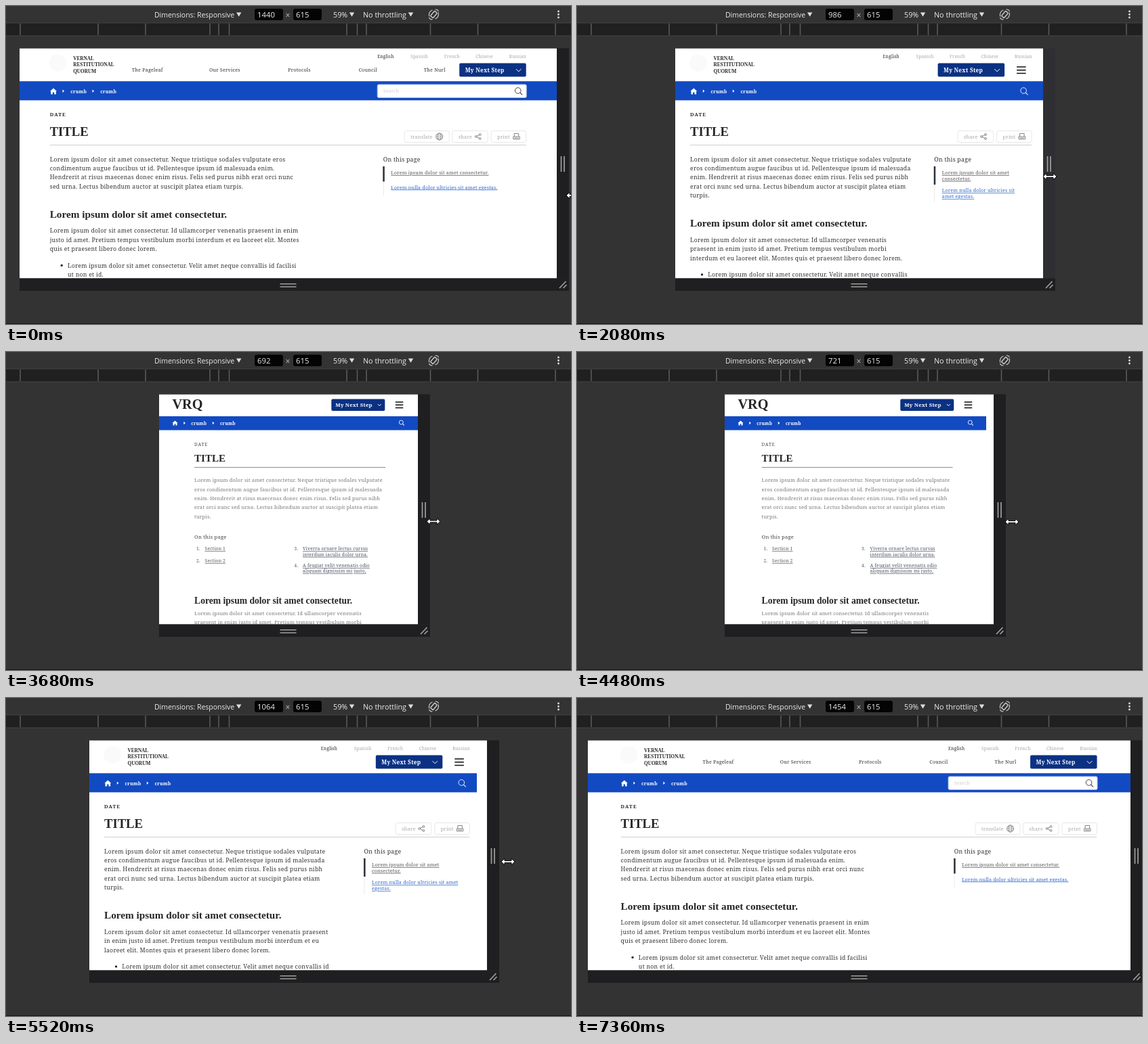
Recreate the animation shown at these times as an HTML page. Size 834 px wide and 470 px high, loop 7.44 s.

```html
<!DOCTYPE html>
<html lang="en">
<head>
<meta charset="utf-8">
<title>Responsive resize</title>
<style>
  html, body { margin: 0; width: 100%; height: 100%; overflow: hidden; background: #333; }
  svg { display: block; }
  text { white-space: pre; }
  .ui { font-family: "Open Sans", "Noto Sans", sans-serif; fill: #ececec; }
  .body { font-family: "Noto Serif", serif; letter-spacing: .03em; }
  .head { font-family: "Liberation Serif", "Times New Roman", serif; font-weight: 700; }
  .link { text-decoration: underline; text-decoration-thickness: .6px; text-underline-offset: 1.6px; }
</style>
</head>
<body>
<svg id="stage" width="834" height="470" viewBox="0 0 834 470"></svg>
<script>
const LOOP = 7440, STEP = 80, SCALE = 0.5503, MID = 416.6;
const TOP = 62.5, BOTTOM = 402.5;
const BLUE = '#124ac2', NAVY = '#0b3183', INK = '#262626';

// [time, viewport width]
const WIDTHS = [[0, 1440], [160, 1454], [400, 1454], [800, 1404], [1040, 1277], [1120, 1277],
  [1600, 1114], [2000, 996], [2080, 986], [2400, 896], [2880, 752], [2960, 742], [3200, 721],
  [3600, 692], [4000, 692], [4320, 701], [4400, 701], [4480, 721], [4800, 801], [5360, 1039],
  [5440, 1060], [5520, 1064], [5600, 1096], [6400, 1314], [7120, 1454], [7440, 1454]];
const CURSOR_X = [[0, 837], [200, 848], [800, 821], [1120, 789], [1600, 744], [2080, 698],
  [2400, 674], [2960, 640.5], [3200, 631], [4000, 631], [4480, 642], [4800, 680],
  [5520, 741], [6400, 802], [7200, 850]];
const CURSOR_Y = [[0, 280], [1120, 264], [2080, 252], [2960, 250], [4480, 251], [5520, 242], [7200, 240]];

const INTRO = 'Lorem ipsum dolor sit amet consectetur. Neque tristique sodales vulputate eros condimentum augue faucibus ut id. Pellentesque ipsum id malesuada enim. Hendrerit at risus maecenas donec enim risus. Felis sed purus nibh erat orci nunc sed urna. Lectus bibendum auctor at suscipit platea etiam turpis.';
const DETAIL = 'Lorem ipsum dolor sit amet consectetur. Id ullamcorper venenatis praesent in enim justo id amet. Pretium tempus vestibulum morbi interdum et eu laoreet elit. Montes quis et praesent libero donec lorem.';
const ITEM = 'Lorem ipsum dolor sit amet consectetur. Velit amet neque convallis id facilisi ut non et id.';
const HEADING = 'Lorem ipsum dolor sit amet consectetur.';

// word counts after which each paragraph breaks
const BREAKS = {
  wide: { intro: [11, 21, 35], detail: [12, 25], item: [12] },
  mid: { intro: [10, 20, 32, 44], detail: [10, 22], item: [11] },
  narrow: { intro: [10, 20, 32, 44], detail: [9, 19], item: [10] }
};

function at(table, t) {
  if (t <= table[0][0]) return table[0][1];
  for (let i = 1; i < table.length; i++) {
    const [t0, a] = table[i - 1], [t1, b] = table[i];
    if (t <= t1) return a + (b - a) * (t - t0) / (t1 - t0);
  }
  return table[table.length - 1][1];
}

const widthAt = t => Math.round(at(WIDTHS, t));

function wrap(text, breaks) {
  const words = text.split(' '), cuts = [0, ...breaks, words.length];
  return cuts.slice(1).map((end, i) => words.slice(cuts[i], end).join(' '));
}

const rect = (x, y, w, h, fill, extra = '') =>
  `<rect x="${x}" y="${y}" width="${w}" height="${h}" fill="${fill}" ${extra}/>`;
const path = (d, stroke, w = 1) =>
  `<path d="${d}" fill="none" stroke="${stroke}" stroke-width="${w}"/>`;
const text = (cls, x, y, size, str, fill, weight) =>
  `<text class="${cls}" x="${x}" y="${y}" font-size="${size}" style="${fill ? `fill:${fill};` : ''}${weight ? `font-weight:${weight}` : ''}">${str}</text>`;
const lines = (list, x, y, gap, size, fill, cls = 'body') =>
  list.map((s, i) => text(cls, x, y + i * gap, size, s, fill)).join('');
const spaced = (str, gap) => `<tspan style="letter-spacing:${gap}px">${str}</tspan>`;

const caret = (x, y) => `<path d="M${x - 3.7} ${y - 3}h7.4l-3.7 6.2z" fill="#ddd"/>`;
const chevron = (x, y, r) => path(`M${x - r} ${y - r / 2}l${r} ${r}l${r} ${-r}`, '#fff', 1);
const lens = (x, y, r, color) =>
  `<circle cx="${x - 1}" cy="${y - 1}" r="${r}" fill="none" stroke="${color}"/>` +
  path(`M${x - 1 + r * .7} ${y - 1 + r * .7}l${r * .8} ${r * .8}`, color, 1.1);
const burger = (x, y, w, gap) =>
  path([-1, 0, 1].map(i => `M${x} ${y + i * gap}h${w}`).join(''), '#111', 1.5);
const crumbArrow = (x, y) => `<path d="M${x - 1.2} ${y - 2.2}l2.6 2.2l-2.6 2.2z" fill="#fff"/>`;
const home = (x, y, k) =>
  `<path transform="translate(${x} ${y}) scale(${k})" d="M-5 0L0-4.5L5 0H3.8V4.5H1.2V1.5H-1.2V4.5H-3.8V0z" fill="#fff"/>`;

function toolbar(w) {
  const ticks = [21, 136, 206, 301, 314, 329.5, 503, 518.5, 532, 626.5, 696.5, 811];
  return rect(0, 0, 834, 470, '#333') +
    rect(0, 25, 834, 19, '#202020') + rect(0, 24.5, 834, 1, '#444') + rect(0, 43.5, 834, 1, '#444') +
    ticks.map(x => rect(x - .75, 26, 1.5, 17, '#5c5c5c')).join('') +
    text('ui', 219, 17, 10.45, 'Dimensions: Responsive') + caret(343.7, 12.5) +
    rect(367, 4, 42, 17, '#040404', 'rx="3"') + text('ui', 371, 17, 11.3, w) +
    text('ui', 412.5, 18, 12, '×', '#bbb') +
    rect(424, 4, 42, 17, '#040404', 'rx="3"') + text('ui', 428, 17, 11.3, '615') +
    text('ui', 483, 17, 10.8, '59%') + caret(510.5, 12.5) +
    text('ui', 527, 17, 10.75, 'No throttling') + caret(597.5, 12.5) +
    `<g transform="translate(631.5 12.5)">` +
    rect(-2.5, -4.8, 5, 9.6, 'none', 'rx="1" transform="rotate(40)" stroke="#ccc" stroke-width="1.4"') +
    path('M-2-6.5A7 7 0 0 0-6.5 3M2 6.5A7 7 0 0 0 6.5-3M2-7.5q4 0 5 3M-2 7.5q-4 0-5-3', '#ccc', 1.2) + '</g>' +
    [8, 12.5, 17].map(y => `<circle cx="815.5" cy="${y}" r="1.4" fill="#ddd"/>`).join('') +
    rect(0, 469, 834, 1, '#161616');
}

function frameBars(left, right, fading) {
  const handle = '#a0a0a0';
  return rect(right, TOP, 18, BOTTOM - TOP, fading ? '#2f2f33' : '#1f1f21') +
    rect(left, BOTTOM, right - left + 18, 18.5, '#1f1f21') +
    path(`M${right + 6.5} 222v23M${right + 11} 222v23`, handle, 1.7) +
    path('M404.5 410.7h24M404.5 415h24', handle, 1.6) +
    path(`M${right + 4} 417l9.5-10M${right + 9.5} 417l5-5`, handle, 1.7);
}

function toolButton(x, w, label, icon) {
  return rect(x, 184.5, w, 17, '#fff', 'rx="2.5" stroke="#e8e8e8"') +
    text('body', x + 9, 195.8, 7.3, label, '#a8a8a8') +
    `<g transform="translate(${x + w - 14.5} 193)">${icon}</g>`;
}

const GLOBE = '<circle r="5" fill="none" stroke="#777" stroke-width=".9"/><ellipse rx="2.2" ry="5" fill="none" stroke="#777" stroke-width=".7"/>' +
  path('M-5 0h10M-4.2-2.6h8.4M-4.2 2.6h8.4', '#777', .6);
const SHARE = path('M3-3L-3 0L3 3', '#777', .9) +
  [[3, -3], [-3, 0], [3, 3]].map(([x, y]) => `<circle cx="${x}" cy="${y}" r="1.4" fill="#fff" stroke="#777" stroke-width=".9"/>`).join('');
const PRINT = path('M-3 0V-4.5H3.5V0M-4.5 0H5V3.8H-4.5zM-3 2H3.5', '#777', .9);

function sidebar(x, oneLine, narrow) {
  const first = oneLine ? [HEADING] : wrap(HEADING, [5]);
  const second = oneLine ? ['Lorem nulla dolor ultricies sit amet egestas.']
    : wrap('Lorem nulla dolor ultricies sit amet egestas.', [narrow ? 5 : 6]);
  return text('body', x, 229.5, 8.75, 'On this page', '#333', 500) +
    rect(x, 237, .8, oneLine ? 43 : 53, '#e4e4e4') +
    rect(x - .5, 237, 2.5, oneLine ? 22.5 : 27, '#2b2f3a') +
    lines(first, x + 11.5, 249, 8.8, 7.1, '#555', 'body link') +
    lines(second, x + 11.5, oneLine ? 270.5 : 275.2, 9.2, 7.1, '#2b64c9', 'body link');
}

function desktop(L, barW) {
  const full = L >= 1200, px = L * SCALE;
  const C = full ? Math.min(703, px - 88) : px - 44;
  const x = full ? (px - C) / 2 : 22, r = x + C;
  const mode = L >= 1120 ? 'wide' : L >= 1015 ? 'mid' : 'narrow';
  const br = BREAKS[mode], drop = mode === 'wide' ? 0 : 13.5;
  const btn = full ? r - 98.5 : r - 138.5;
  let s = `<circle cx="${x + 12}" cy="84" r="13" fill="#fafafa"/>`;
  s += lines(['VERNAL', 'RESTITUTIONAL', 'QUORUM'], x + 34.5, 80, 9.25, 7.25, INK, 'head');
  s += [['English', 219.5], ['Spanish', 170.5], ['French', 121], ['Chinese', 74.5], ['Russian', 25]]
    .map(([n, d], i) => text('body', r - d, 77.3, 6.5, n, i ? '#a6a6a6' : INK)).join('');
  if (full) {
    s += [['The Pageleaf', 121], ['Our Services', 213], ['Protocols', 307], ['Council', 389], ['The Nurl', 463]]
      .map(([n, d], i) => text('body', x + d + i * (C - 614) / 4, 96.8, 7.15, n, '#333')).join('');
  } else s += burger(r - 22, 94.8, 13.5, 4.7);
  s += rect(btn, 84.5, 98.5, 20, NAVY, 'rx="2"') +
    text('body', btn + 8.5, 98.3, 8.25, 'My Next Step', '#fff', 700) + chevron(btn + 87.5, 95, 3.8);

  s += rect(0, 111.2, barW, 28.2, BLUE) + home(x + 5.3, 126, 1) +
    crumbArrow(x + 20, 125.8) + crumbArrow(x + 64, 125.8) +
    text('body', x + 30.5, 128.6, 6.8, 'crumb', '#fff', 700) +
    text('body', x + 74.5, 128.6, 6.8, 'crumb', '#fff', 700);
  s += full
    ? rect(r - 219.5, 116, 220, 19.5, '#fff', 'rx="2" stroke="#a9bde8"') +
      text('body', r - 211, 128.4, 6.9, 'Search', '#ccc') + lens(r - 11, 126, 4.3, '#444')
    : lens(r - 11, 126, 4.3, '#dfe8fb');

  s += text('body', x, 162.9, 7.2, spaced('DATE', 1.1), INK, 600) +
    text('head', x, 192, 18.6, 'TITLE', INK) + rect(x, 205, C, 1, '#cfcfcf');
  if (full) s += toolButton(r - 179.5, 66, 'translate', GLOBE);
  s += toolButton(r - 109, 52.5, 'share', SHARE) + toolButton(r - 51.5, 51.5, 'print', PRINT);

  s += lines(wrap(INTRO, br.intro), x, 229.6, 13.4, 8.7, '#333') +
    sidebar(x + .663 * C + 26, C > 590, mode === 'narrow') +
    text('head', x, 312.7 + drop, 15.25, HEADING, INK) +
    lines(wrap(DETAIL, br.detail), x, 335.4 + drop, 13.4, 8.7, '#333') +
    `<circle cx="${x + 17.5}" cy="${383.4 + drop}" r="1.7" fill="${INK}"/>` +
    lines(wrap(ITEM, br.item), x + 26.3, 386.6 + drop, 13.4, 8.7, '#333');
  return s;
}

function mobile(L, barW) {
  const px = L * SCALE, x = (px - 282) / 2 + 2.7, br = BREAKS.narrow, grey = '#777';
  const entry = (dx, y, n, list, fill) => text('body', x + dx, y, 6.5, n + '.', '#555') +
    lines(list, x + dx + 12.5, y, 8.4, 6.7, fill, 'body link');
  return text('head', 19.5, 84.3, 20.2, 'VRQ', INK) +
    rect(px - 126.5, 69.5, 79, 17.5, NAVY, 'rx="2"') +
    text('body', px - 120.5, 81.3, 7.75, 'My Next Step', '#fff', 700) + chevron(px - 55.5, 78.3, 2.4) +
    burger(px - 32, 78.3, 11.5, 4.3) +
    rect(0, 95, barW, 20.5, BLUE) + home(23.5, 105, .8) + crumbArrow(37.5, 105) + crumbArrow(80, 105) +
    text('body', 47.3, 107.5, 6.5, 'crumb', '#fff', 700) + text('body', 90, 107.5, 6.5, 'crumb', '#fff', 700) +
    lens(px - 22.5, 105, 3, '#dfe8fb') +
    text('body', x, 138.5, 6.4, spaced('DATE', .9), '#444') +
    text('head', x, 161.8, 15, 'TITLE', INK) + rect(x, 170, 282, 1, '#918b93') +
    lines(wrap(INTRO, br.intro), x, 192.2, 13.4, 7.4, grey) +
    text('body', x, 276, 7.55, 'On this page', '#444') +
    entry(3, 293.4, 1, ['Section 1'], '#555') + entry(3, 311.4, 2, ['Section 2'], '#555') +
    entry(147.5, 293.4, 3, ['Viverra ornare lectus cursus', 'interdum iaculis dolor urna.'], '#49505f') +
    entry(147.5, 318, 4, ['A feugiat velit venenatis odio', 'aliquam dignissim mi justo,'], '#49505f') +
    text('head', x, 371.6, 13.6, HEADING, INK) +
    lines(wrap(DETAIL, br.detail), x, 388.6, 13.4, 7.4, grey);
}

function cursor(x, y) {
  return `<path transform="translate(${x} ${y})" d="M-10 0L-5-4.8V-1.4H5V-4.8L10 0L5 4.8V1.4H-5V4.8z" fill="#fff" stroke="#000" stroke-width="1"/>`;
}

function draw(t) {
  const w = widthAt(t), L = widthAt(t - 80), barW = Math.ceil(widthAt(t - 160) * SCALE);
  const half = w * SCALE / 2;
  // the page covers every pixel it touches
  const left = Math.floor(MID - half), right = Math.ceil(MID + half);
  const page = L < 768 ? mobile(L, barW) : desktop(L, barW);
  const view = fill => rect(0, TOP, right - left, BOTTOM - TOP, fill);
  return toolbar(w) + frameBars(left, right, t > 300 && t < 2700) +
    `<clipPath id="view">${view('#fff')}</clipPath>` +
    `<g transform="translate(${left} 0)"><g clip-path="url(#view)">${view('#fff')}${page}</g></g>` +
    cursor(at(CURSOR_X, t), at(CURSOR_Y, t));
}

const stage = document.getElementById('stage');
let shown = -1;
function tick() {
  const t = Math.floor(performance.now() % LOOP / STEP) * STEP;
  if (t !== shown) stage.innerHTML = draw(shown = t);
  requestAnimationFrame(tick);
}
tick();
</script>
</body>
</html>
```
